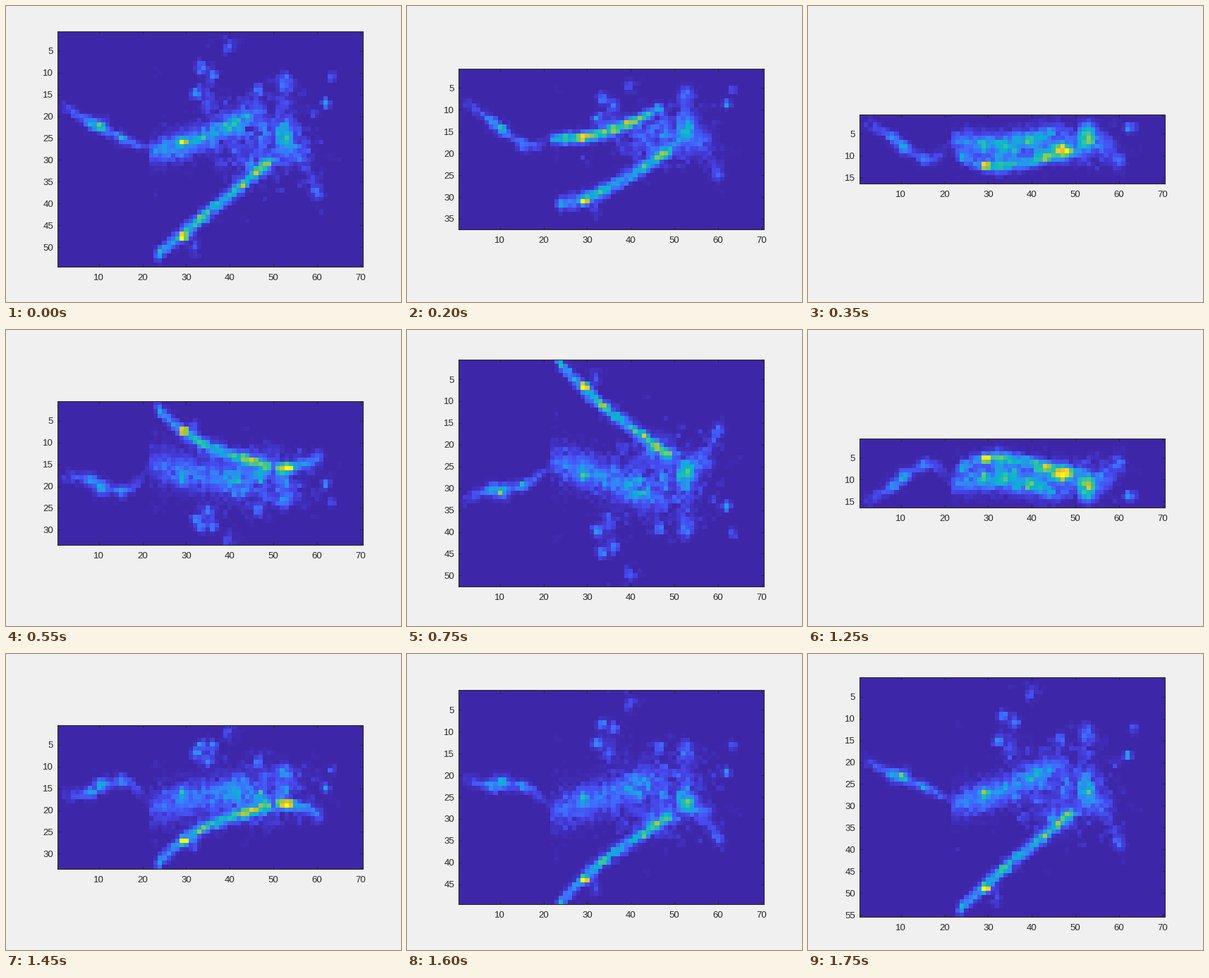
These frames come from a looping animation (560x420 px, 1.8 s). A matplotlib script:

```python
import numpy as np
import matplotlib.pyplot as plt
from matplotlib.animation import FuncAnimation
from matplotlib.colors import LinearSegmentedColormap

W, H, DPI = 560, 420, 100
FRAMES, COLS = 36, 70
LEFT, WIDTH, MID_Y = 73, 433, 203
INK = "#262626"
PX = 72 / DPI

rng = np.random.default_rng(12)

PARULA = LinearSegmentedColormap.from_list("parula", [
    "#3e26a8", "#4747eb", "#3e6fff", "#2797eb", "#08b5d0",
    "#31c69f", "#81cc59", "#dcbd29", "#fcd030", "#f9fb14"])


def tilt(x, u, w, deg):
    """Points given in a frame turned by deg about the x axis."""
    a = np.radians(deg)
    return np.array([x, u * np.cos(a) - w * np.sin(a),
                     u * np.sin(a) + w * np.cos(a)])


def strand(x0, x1, t, path, thin, wide, deg=0):
    """Points at the fractions t of a curve, scattered across it."""
    u, w = path(t)
    return tilt(x0 + (x1 - x0) * t, u + rng.normal(0, thin, t.size),
                w + rng.normal(0, wide, t.size), deg)


def blob(x, y, z, n, sx, thin, wide, deg=0):
    g = rng.normal(size=(3, n))
    return tilt(sx * g[0], thin * g[1], wide * g[2], deg) + np.array([[x], [y], [z]])


def lumps(cloud, copies, jitter):
    cloud = np.repeat(cloud, copies, axis=1)
    return cloud + rng.normal(0, jitter, cloud.shape)


whip = strand(1, 22, rng.beta(1.6, 1.6, 480),
              lambda t: (-10.4 + 10.9 * t + .8 * np.sin(np.pi * t),
                         -3 + 6.2 * np.sin(np.pi * t**2)), .65, .8)
neck = strand(23, 50, rng.beta(1.15, 1.15, 2000),
              lambda t: (24.6 - 22.4 * t, -1 - 7 * (1 - t)**4), 1, .9)
wing = strand(21.5, 47, rng.beta(1.3, 1.4, 2400),
              lambda t: (-1 - 7.5 * t**2.2, -2.5 + 7 * t),
              .75, 1.5 + 1.7 * np.sin(np.pi * np.linspace(0, 1, 2400)), 40)
tail = strand(51, 61.5, rng.beta(.8, 1.3, 480),
              lambda t: (-1.4 - 2.8 * t**1.5, 4 - 14 * t**1.5), .8, 2.6, 110)

sheets = [
    blob(53.2, -2.2, -2.4, 270, 1.1, .7, 3, 110),
    blob(28.8, -1.6, 0, 130, .8, .5, 1.4, 20),
    blob(35, -11, 5, 130, 1, 2.5, 1),
    blob(53, -11, 0, 120, 1.4, 2.8, 1.5),
    blob(31.8, 22, -3.5, 60, .6, 1.8, 1),
    lumps(blob(47, -2, 0, 250, 6, 2, 5, 70), 8, .5),
    lumps(blob(42, 0, 1, 60, 12, 2.5, 9, 70), 3, .5)]

# Dense spots: place, number of points, size
spots = [blob(x, y, z, n, .9 * s, s, s) for x, y, z, n, s in [
    (29.5, 20.1, -3.4, 160, .55), (33.8, 15.7, -1.7, 70, .9),
    (43, 8.3, -1.2, 70, .7), (46, 5.3, -1.7, 70, .6), (48, 3.5, -.8, 65, .6),
    (45.5, 4, -1, 110, 1.4), (8, -5.8, -.8, 90, .9), (10.4, -5.3, 1.4, 140, .9),
    (15.3, -2.4, 3.2, 50, .9), (33.5, -18.5, 6, 90, .8),
    (32.4, -12.6, 6, 105, .7), (36.1, -17, 6.6, 70, .7),
    (40, -23.3, 7.4, 65, 1), (46.5, -13.5, 3.6, 60, .7),
    (52.6, -15.5, .8, 130, 1.1), (59.7, 10, -.6, 55, .9),
    (62, -10.5, -1.5, 70, .5), (63.5, -16.5, .9, 32, .7)]]

X, Y, Z = np.hstack([whip, neck, wing, tail] + sheets + spots)

# Differences (height, depth) between opposite outer points of the cloud
SPANS = np.array([(53.95, -7), (50, -16.4), (0, 16.5)])


def project(k):
    a = 2 * np.pi * k / FRAMES
    c, s = np.cos(a), np.sin(a)
    rows = int(np.ceil(np.abs(SPANS @ (c, s)).max()))
    shift = .3 * (c - 1) + .5 * s + 1.1 * np.sin(3 * a)
    v = Y * c + Z * s - shift + (rows + 1) / 2
    counts, _, _ = np.histogram2d(
        v, X, bins=(rows, COLS), range=((.5, rows + .5), (.5, COLS + .5)))
    return counts


plt.rcParams["font.family"] = "Liberation Sans"
fig = plt.figure(figsize=(W / DPI, H / DPI), dpi=DPI, facecolor="#f0f0f0")
ax = fig.add_axes((0, 0, 1, 1))
img = ax.imshow(np.zeros((2, COLS)), cmap=PARULA, interpolation="nearest",
                aspect="auto")
ax.tick_params(direction="in", top=True, right=True, length=4.3 * PX,
               width=PX, color=INK, labelcolor=INK, labelsize=13.3 * PX)
ax.tick_params(axis="x", pad=10 * PX)
ax.tick_params(axis="y", pad=6 * PX)
for side in ax.spines.values():
    side.set(linewidth=PX, color=INK)


def draw(k):
    counts = project(k)
    rows = len(counts)
    height = rows * WIDTH / COLS
    ax.set_position((LEFT / W, 1 - (MID_Y + height / 2) / H,
                     WIDTH / W, height / H))
    img.set_data(counts)
    img.set_extent((.5, COLS + .5, rows + .5, .5))
    img.set_clim(0, counts.max())
    ax.set(xlim=(.5, COLS + .5), ylim=(rows + .5, .5),
           xticks=range(10, COLS + 1, 10), yticks=range(5, rows + 1, 5))
    return [img]


anim = FuncAnimation(fig, draw, frames=FRAMES, interval=50, repeat=True,
                     repeat_delay=0, blit=False)
plt.show()
```
